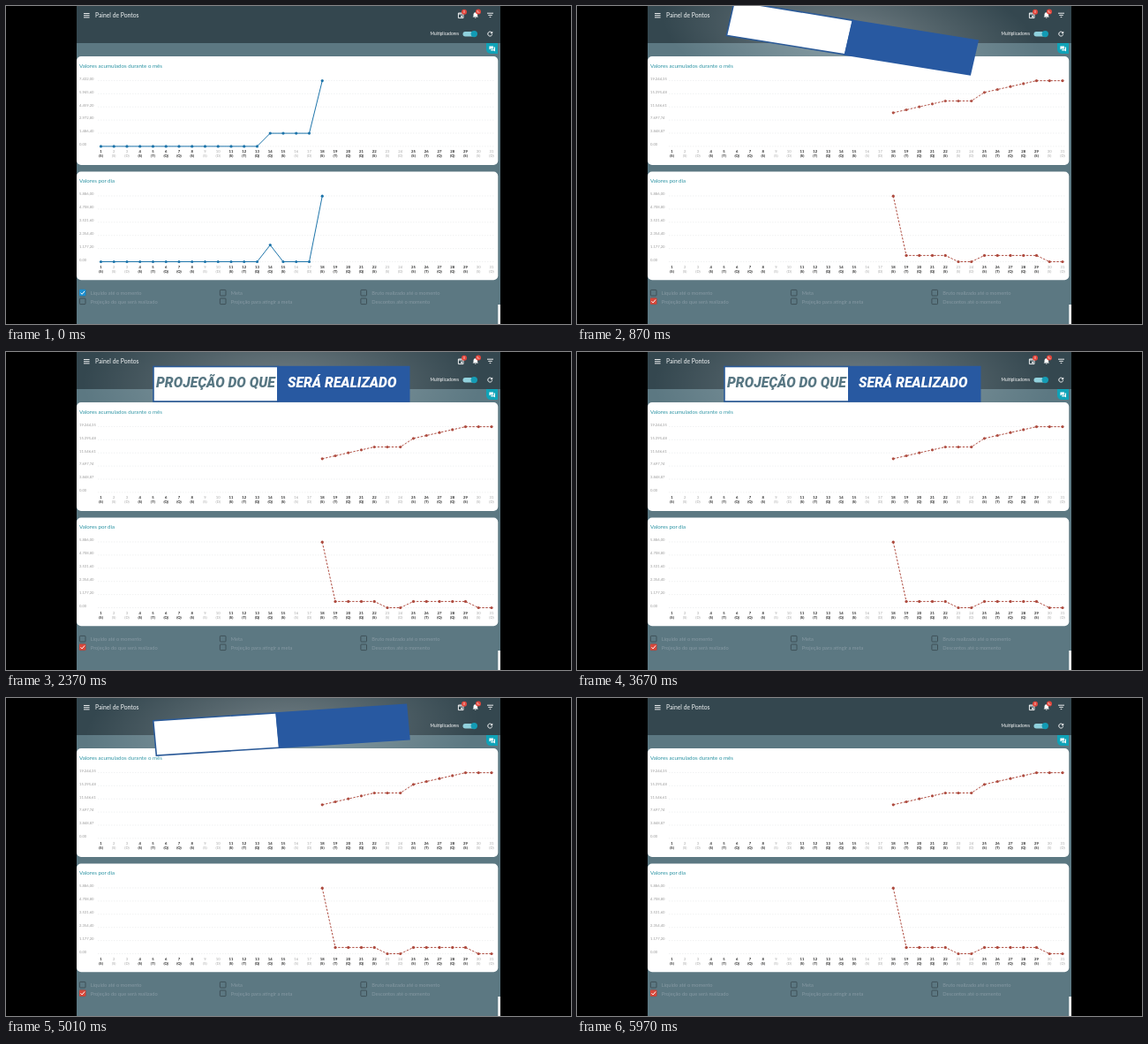
Write an HTML page that moves like this. It is 640 px wide and 360 px high and loops after 6.05 s.

```html
<!DOCTYPE html>
<html lang="pt">
<head>
<meta charset="utf-8">
<title>Painel de Pontos</title>
<style>
  html, body { margin: 0; width: 100%; height: 100%; overflow: hidden; background: #000; }
  svg { display: block; width: 100vw; height: 100vh; }
  text { font-family: Lato, "Open Sans", sans-serif; white-space: pre; }
  .banner text { font: italic 900 15.6px Roboto, Inter, sans-serif; }
</style>
</head>
<body>
<svg id="stage" viewBox="0 0 640 360"></svg>
<script>
const LOOP = 6050;
const SWITCH_AT = 30;
const STRETCH = 1.188;
const BLUE = '#1d74aa', RED = '#ae4b3f';
const stage = document.getElementById('stage');

function add(parent, tag, attrs = {}, content) {
  const node = document.createElementNS('http://www.w3.org/2000/svg', tag);
  for (const key in attrs) node.setAttribute(key, attrs[key]);
  if (content !== undefined) node.textContent = content;
  parent.appendChild(node);
  return node;
}
const rect = (p, x, y, width, height, fill, extra) =>
  add(p, 'rect', { x, y, width, height, fill, ...extra });
const path = (p, d, stroke, extra) =>
  add(p, 'path', { d, stroke, fill: 'none', ...extra });
const label = (p, x, y, size, fill, content, extra) =>
  add(p, 'text', { x, y, 'font-size': size, fill, ...extra }, content);
const circle = (p, cx, cy, r, fill) => add(p, 'circle', { cx, cy, r, fill });

const dayX = day => 107.5 + (day - 1) * 14.75;
const range = (from, to) => Array.from({ length: to - from + 1 }, (_, i) => from + i);

function drawHeader(p) {
  rect(p, 80, 0, 480, 42, '#34474f');
  path(p, 'M88 8.5h6.6M88 10.7h6.6M88 12.9h6.6', '#fff', { 'stroke-width': 0.9 });
  label(p, 101, 13, 6.8, '#f2f5f6', 'Painel de Pontos');

  path(p, 'M512.4 8h5.6v5.6h-5.6zM512.4 9h5.6', '#fff', { 'stroke-width': 0.9 });
  rect(p, 515.2, 10.8, 1.8, 1.8, '#fff');
  add(p, 'path', { d: 'M528.6 12.6l.9-1.2v-1.9a2.3 2.3 0 0 1 4.6 0v1.9l.9 1.2zM531 13.1h1.6l-.8 1z', fill: '#fff' });
  for (const [x, y, n] of [[519, 6.8, '0'], [535, 6.6, '9+']]) {
    circle(p, x, y, 3, '#e2463c');
    label(p, x, y + 1.2, 3.2, '#fff', n, { 'text-anchor': 'middle' });
  }
  path(p, 'M545 8.2h7M546.3 10.4h4.4M547.7 12.6h1.6', '#fff', { 'stroke-width': 0.9 });

  label(p, 480.5, 33, 4.8, '#fff', 'Multiplicadores');
  rect(p, 517.5, 29, 15.5, 5.4, '#8fd0dc', { rx: 2.7 });
  circle(p, 530.3, 31.6, 3.7, '#139bb4');
  path(p, 'M550.2 30a2.5 2.5 0 1 0 .5 2.2', '#fff', { 'stroke-width': 0.9 });
  add(p, 'path', { d: 'M551.2 28.6v2.6h-2.6z', fill: '#fff' });
}

function drawChat(p) {
  add(p, 'path', { d: 'M557 42v12h-8a5 5 0 0 1-5-5v-7z', fill: '#10a3b8' });
  add(p, 'path', { d: 'M547.4 45.4h4.6v3h-3.4l-1.2 1.2z', fill: '#fff' });
  add(p, 'path', { d: 'M552.8 46.6h1.2v5l-1.2-1.2h-3.6v-1.2h3.6z', fill: '#fff' });
}

function drawCard(p, top, height, title, zeroY) {
  rect(p, 80, top, 477.3, height, '#fff', { rx: 5 });
  label(p, 83, top + 12.6, 6.2, '#2b93a3', title);
  for (const i of range(0, 5)) {
    const y = zeroY - i * 14.9;
    path(p, `M104 ${y}H553`, '#e6e8e9', { 'stroke-width': 0.6, 'stroke-dasharray': '1.5 1.5' });
  }
  for (const day of range(1, 31)) {
    const week = (day + 3) % 7;
    const style = { 'text-anchor': 'middle', 'font-weight': week > 4 ? 400 : 700 };
    const color = week > 4 ? '#a5a5a5' : '#222';
    label(p, dayX(day), zeroY + 7, 4.2, color, day, style);
    label(p, dayX(day), zeroY + 12.3, 4.2, color, `(${'STQQSSD'[week]})`, style);
  }
}

function drawScale(p, zeroY, top) {
  for (const i of range(0, 5)) {
    const value = (top * i / 5).toLocaleString('pt-BR', { minimumFractionDigits: 2, maximumFractionDigits: 2 });
    label(p, 83, zeroY - i * 14.9 - 0.7, 4.2, '#999', value);
  }
}

function drawSeries(p, firstDay, ys, color, dashed) {
  const points = ys.map((y, i) => [dayX(firstDay + i), y]);
  path(p, 'M' + points.join('L'), color, {
    'stroke-width': 1, 'stroke-dasharray': dashed ? '2.4 1.6' : 'none'
  });
  for (const [x, y] of points) circle(p, x, y, 1.6, color);
}

const optionColumns = [
  [83, 'Líquido até o momento', 'Projeção do que será realizado'],
  [242, 'Meta', 'Projeção para atingir a meta'],
  [401.5, 'Bruto realizado até o momento', 'Descontos até o momento']
];

function drawOptions(p) {
  for (const [x, ...names] of optionColumns) {
    names.forEach((name, row) => {
      const y = 321.4 + row * 9.6;
      rect(p, x + 0.4, y, 6.6, 6.6, 'none', { stroke: '#3b4c53', 'stroke-width': 0.9, rx: 0.8 });
      label(p, x + 12.8, y + 5.5, 5.7, '#8699a3', name);
    });
  }
}

function drawCheck(p, y, color) {
  rect(p, 83, y, 7.4, 7.4, color, { rx: 0.9 });
  path(p, `M84.5 ${y + 3.8}l1.6 1.7 3-3.5`, '#fff', { 'stroke-width': 1 });
}

function buildState(p, firstDay, color, dashed, top, total, daily, checkY) {
  const group = add(p, 'g');
  drawScale(group, 158.9, top);
  drawScale(group, 289.5, 5886);
  drawSeries(group, firstDay, total, color, dashed);
  drawSeries(group, firstDay, daily, color, dashed);
  drawCheck(group, checkY, dashed ? '#d8473a' : '#1c8fd0');
  return group;
}

function typedText(p, x, fill, content) {
  const node = add(p, 'text', { x, y: 40, fill });
  return [...content].map(char => add(node, 'tspan', {}, char));
}

const defs = add(stage, 'defs');
rect(add(defs, 'clipPath', { id: 'screen' }), 80, 0, 480, 360, '#000');
const glow = add(defs, 'radialGradient', { id: 'glow' });
add(glow, 'stop', { offset: 0, 'stop-color': '#fff', 'stop-opacity': 0.3 });
add(glow, 'stop', { offset: 1, 'stop-color': '#fff', 'stop-opacity': 0 });

rect(stage, 0, 0, 640, 360, '#000');
const screen = add(stage, 'g', { 'clip-path': 'url(#screen)' });
rect(screen, 80, 0, 480, 360, '#5c7882');
drawHeader(screen);
drawCard(screen, 57, 123, 'Valores acumulados durante o mês', 158.9);
drawCard(screen, 187.6, 122.6, 'Valores por dia', 289.5);
drawChat(screen);
drawOptions(screen);
rect(screen, 557.3, 338, 2.7, 22, '#fff');

const flat = (count, y) => Array(count).fill(y);
const realized = buildState(screen, 1, BLUE, false, 7432,
  [...flat(13, 158.9), ...flat(4, 144.1), 84.6],
  [...flat(13, 289.5), 270.6, ...flat(3, 289.5), 215.2], 320.8);
const projected = buildState(screen, 18, RED, true, 19244.35,
  [120.8, 117.5, 114.1, 110.8, ...flat(3, 107.5), 97.8, 94.5, 91.2, 87.9, ...flat(3, 84.6)],
  [215.2, ...flat(4, 282.4), ...flat(2, 289.5), ...flat(5, 282.4), ...flat(2, 289.5)], 330.4);

const banner = add(screen, 'g', { class: 'banner' });
add(banner, 'ellipse', { cx: 312, cy: 36, rx: 225, ry: 92, fill: 'url(#glow)' });
rect(banner, 167, 16.5, 141, 39.5, '#fff', { stroke: '#2b5a98', 'stroke-width': 1.6 });
rect(banner, 307, 15.8, 150.5, 41, '#2859a1');
const leftChars = typedText(banner, 170, '#587783', 'PROJEÇÃO DO QUE');
const rightChars = typedText(banner, 319, '#fff', 'SERÁ REALIZADO');

const clamp = v => Math.max(0, Math.min(1, v));
const progress = (t, from, to) => clamp((t - from) / (to - from));
const swing = u => (1 - Math.cos(Math.PI * u)) / 2;

// Letters fade in one after another, then fade out in the same order.
function typeOut(chars, t, inFrom, inTo, outFrom, outTo) {
  const shown = progress(t, inFrom, inTo) * chars.length;
  const gone = progress(t, outFrom, outTo) * chars.length;
  chars.forEach((char, i) =>
    char.setAttribute('fill-opacity', clamp(shown - i) * (1 - clamp(gone - i))));
}

function render(t) {
  realized.setAttribute('display', t < SWITCH_AT ? 'inline' : 'none');
  projected.setAttribute('display', t < SWITCH_AT ? 'none' : 'inline');

  const entering = swing(progress(t, 0, 980));
  const leaving = swing(progress(t, 4940, 5950));
  const width = entering * (1 - leaving ** 1.1);
  const angle = 360 * (1 - entering - leaving);
  banner.setAttribute('display', width > 0.001 ? 'inline' : 'none');
  banner.setAttribute('transform',
    `translate(312 36) scale(${STRETCH} 1) rotate(${angle}) scale(${width / STRETCH} 1) translate(-312 -36)`);

  typeOut(leftChars, t, 950, 1670, 3930, 4940);
  typeOut(rightChars, t, 1385, 2370, 3670, 4635);
}

const start = performance.now();
function tick() {
  render((performance.now() - start) % LOOP);
  requestAnimationFrame(tick);
}
tick();
</script>
</body>
</html>
```
